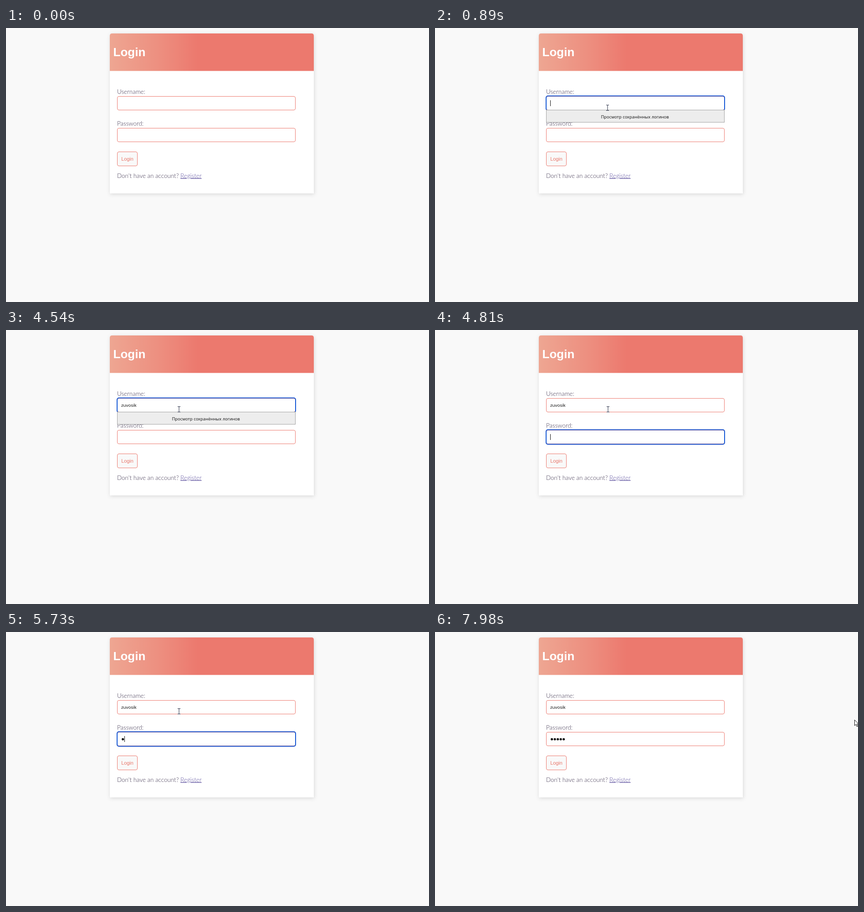
An HTML page for the animation above (8 s loop, 929 px wide and 603 px high).

```html
<!DOCTYPE html>
<html lang="en">
<head>
<meta charset="utf-8">
<title>Login form</title>
<style>
  html, body { margin: 0; width: 100%; height: 100%; overflow: hidden; background: #f9f9f9; }
  svg { display: block; }
  .label { font: 300 13.4px Lato, sans-serif; fill: #3f3450; }
  .link { fill: #6155a0; text-decoration: underline; }
  .title { font: bold 26px "Liberation Sans", sans-serif; fill: #fff; }
  .button { font: 10.9px "Liberation Sans", sans-serif; fill: #e9776b; }
  .value { font: 9.8px "Open Sans", sans-serif; fill: #000; }
  .popup { font: 9.4px "Open Sans", sans-serif; fill: #0c0c0d; }
  .mid { text-anchor: middle; }
  .field { fill: #fff; stroke: #ec7a6f; }
  .ring { fill: none; stroke: #1558d6; stroke-width: 2; }
  .card { filter: drop-shadow(1px 2px 4px rgba(0, 0, 0, .13)); }
</style>
</head>
<body>
<svg width="929" height="603" viewBox="0 0 929 603">
  <defs>
    <linearGradient id="coral">
      <stop offset="0" stop-color="#eea692"/>
      <stop offset=".25" stop-color="#ed8e7f"/>
      <stop offset=".43" stop-color="#ec796e"/>
    </linearGradient>
  </defs>

  <path class="card" fill="#fff" d="M228 364V17q0-5 5-5H671q5 0 5 5V364z"/>
  <path fill="url(#coral)" d="M228 94.5V17q0-5 5-5H671q5 0 5 5V94.5z"/>
  <text class="title" x="235.6" y="62">Login</text>

  <text class="label" x="244" y="145">Username:</text>
  <text class="label" x="244" y="215">Password:</text>
  <rect class="field" x="244.5" y="150.5" width="391" height="30" rx="3.5"/>
  <rect class="field" x="244.5" y="220.5" width="391" height="30" rx="3.5"/>
  <rect class="field" x="244.5" y="272.5" width="44" height="31" rx="3.5" style="fill:#f9f9f9"/>
  <text class="button mid" x="266.5" y="292">Login</text>
  <text class="label" x="244" y="329.5">Don't have an account? <tspan class="link">Register</tspan></text>

  <rect id="ring" class="ring" x="244" width="392" height="32" rx="4"/>
  <text id="user" class="value" x="253" y="169"></text>
  <g id="dots"></g>
  <rect id="caret" width="1" height="13" fill="#111"/>

  <g id="userPopup">
    <rect x="244.5" y="180.5" width="391" height="27" fill="#ededed" stroke="#a3a3a3"/>
    <text class="popup mid" x="439" y="198.5">Просмотр сохранённых логинов</text>
  </g>
  <g id="passPopup">
    <rect x="244.5" y="250.5" width="391" height="61" fill="#fff" stroke="#a3a3a3"/>
    <path d="M245 285.5H635V311H245z" fill="#ededed"/>
    <path d="M245 285.5H635" stroke="#c4c4c4"/>
    <path d="M255 260.5H262M259.5 260.5v2.5M261.5 260.5v2.5" stroke="#666"/>
    <circle cx="252.3" cy="260.5" r="2.7" fill="none" stroke="#666"/>
    <text class="popup" x="265" y="264.5">Нет имени пользователя (05.12.2021)</text>
    <text class="popup" x="265" y="279" style="fill:#6a6a6a">С этого веб-сайта</text>
    <text class="popup mid" x="439" y="302.5">Просмотр сохранённых логинов</text>
  </g>

  <g id="pointer">
    <path id="arrow" d="M.5 .5V13L3.4 10.3 5.6 15.2 7.6 14.3 5.5 9.5H9.6z" fill="#fff" stroke="#111"/>
    <path id="beam" d="M-3 -5.5H-1L0 -5 1 -5.5H3M0 -5V6M-3 6.5H-1L0 6 1 6.5H3" fill="none" stroke="#222840"/>
  </g>
</svg>
<script>
const $ = id => document.getElementById(id);
const NAME = 'zuvosik';
const NAME_KEYS = [1740, 1840, 1940, 2140, 3680, 3880, 4140];
const PASS_KEYS = [5730, 5930, 6130, 6330, 6530];
const CARET_ON = [[810, 1340], [1740, 2410], [2940, 3480], [3680, 4540], [4740, 5270], [5730, 6880]];
// Pointer moves: start, end, number of steps, from, to
const MOVES = [
  [70, 736, 10, [842, 573], [379, 175]],
  [3780, 3780, 1, [379, 175], [380, 174]],
  [6880, 7430, 9, [380, 174], [260, 290]],
  [7700, 7980, 5, [260, 290], [921, 193]]
];

const within = (t, a, b) => t >= a && t < b;
const typed = (keys, t) => keys.filter(k => t >= k).length;
const show = (id, on) => $(id).setAttribute('visibility', on ? 'visible' : 'hidden');
const ease = p => p * p * (3 - 2 * p);

$('dots').innerHTML = PASS_KEYS.map((_, i) =>
  `<circle cx="${256.6 + 6.5 * i}" cy="236" r="2.5"/>`).join('');

function pointerAt(t) {
  const [start, end, steps, from, to] = MOVES.filter(m => t >= m[0]).pop() || MOVES[0];
  const p = t >= end ? 1 : Math.max(0, Math.floor((t - start) / (end - start) * (steps - 1) + .01) / (steps - 1));
  return from.map((v, i) => Math.round(v + (to[i] - v) * ease(p)));
}

function draw(t) {
  const inPass = t >= 4740;
  const dots = typed(PASS_KEYS, t);
  $('user').textContent = NAME.slice(0, typed(NAME_KEYS, t));
  [...$('dots').children].forEach((d, i) => d.setAttribute('opacity', i < dots ? 1 : 0));

  show('ring', within(t, 810, 7500));
  $('ring').setAttribute('y', inPass ? 219.5 : 149.5);
  show('userPopup', within(t, 890, 4740));
  show('passPopup', within(t, 4880, 5730));

  const width = inPass ? dots * 6.5 : $('user').getComputedTextLength();
  $('caret').setAttribute('x', Math.round(253 + width));
  $('caret').setAttribute('y', inPass ? 229 : 159);
  show('caret', CARET_ON.some(([a, b]) => within(t, a, b)));

  const [x, y] = pointerAt(t);
  const overField = within(x, 244, 637) && (within(y, 150, 181) || within(y, 220, 251));
  $('pointer').setAttribute('transform', `translate(${x} ${y})`);
  show('arrow', t >= 70 && !overField);
  show('beam', t >= 70 && overField);
}

function tick() {
  draw(performance.now() % 8000);
  requestAnimationFrame(tick);
}
tick();
</script>
</body>
</html>
```
